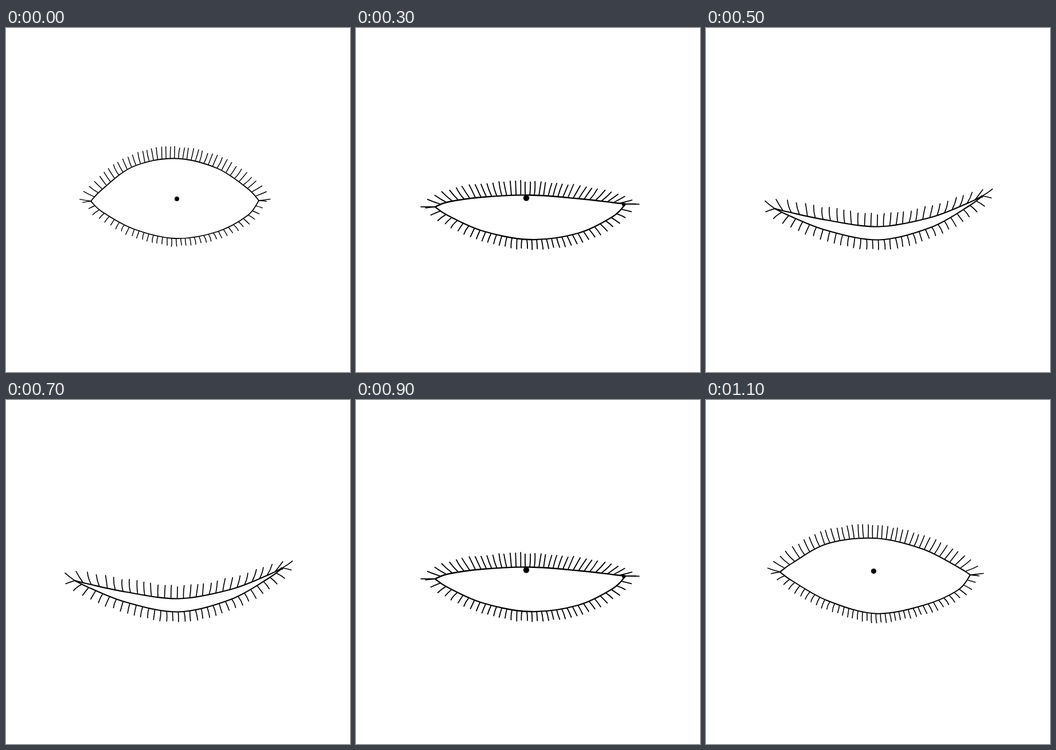
Animation of 600x600 px, one loop 1200 ms. Source, as an HTML page:

```html
<!DOCTYPE html>
<html lang="en">
<head>
<meta charset="utf-8">
<title>Blinking eye</title>
<style>
  html, body { margin: 0; width: 100%; height: 100%; overflow: hidden; background: #fff; }
  svg { display: block; width: 100vw; height: 100vh; }
  path { fill: none; stroke: #000; stroke-linecap: round; stroke-linejoin: round; }
</style>
</head>
<body>
<svg id="stage" viewBox="0 0 600 600"></svg>
<script>
const NS = "http://www.w3.org/2000/svg";
const STEP = 100;
const LEAN = 3;       // degrees every lash tilts to the right
const FLARE = 35;     // extra degrees at the very corners
const CROWDING = 0.15; // how much closer lashes stand near the corners

// heights: lid between the corners; spread: degrees the outer lashes tilt
const wide = {
  ink: 1.8, dots: [[298, 298, 4]], left: [148, 302], right: [441, 301],
  upper: { heights: [281.5, 242, 227.5, 244.5, 280], count: 41, length: 20, spread: 45 },
  lower: { heights: [320.5, 350, 367, 355.5, 327], count: 37, length: 13, spread: 48 }
};
const open = {
  ink: 2, dots: [[292.5, 298.5, 4.6]], left: [129, 300], right: [461, 305],
  upper: { heights: [284, 250.5, 241, 260, 291], count: 40, length: 23, spread: 43 },
  lower: { heights: [316, 350, 372.5, 358.5, 332], count: 41, length: 15, spread: 45 }
};
const lowered = {
  ink: 2.1, dots: [[296.5, 298, 5]], left: [131, 311], right: [470, 300],
  upper: { heights: [299, 273, 266.5, 277, 293.5], count: 39, length: 22, spread: 46 },
  lower: { heights: [329.5, 359, 376, 361, 329], count: 39, length: 18, spread: 44 }
};
const drowsy = {
  ink: 2.3, dots: [[297, 296.5, 5.2], [467, 308, 3]], left: [138, 312], right: [470, 307],
  upper: { heights: [303.5, 295, 291.5, 297.5, 304.5], count: 37, length: 24, spread: 55 },
  lower: { heights: [327, 354, 369, 358, 329], count: 37, length: 17, spread: 52 }
};
const narrow = {
  ink: 2.1, dots: [[481, 294, 2.3]], left: [120, 315], right: [482, 293],
  upper: { heights: [321, 335, 346.5, 330.5, 305], count: 30, length: 22, spread: 18 },
  lower: { heights: [327, 353, 369.5, 348, 311], count: 34, length: 17, spread: 38 }
};

// Halfway between two poses, through nested values
function midway(a, b) {
  if (typeof a === "number") return (a + b) / 2;
  if (Array.isArray(a)) return a.map((v, i) => midway(v, b[i]));
  return Object.fromEntries(Object.keys(a).map(k => [k, midway(a[k], b[k])]));
}
const nearly = midway({ ...drowsy, dots: [] }, { ...narrow, dots: [] });
const shut = { ...narrow, upper: { ...narrow.upper, heights: narrow.lower.heights } };

const poses = [wide, open, lowered, drowsy, nearly, narrow, shut];
const stage = document.getElementById("stage");

let seed = 71;
const jitter = size => {
  seed = (seed * 16807) % 2147483647;
  return (seed / 2147483647 * 2 - 1) * size;
};

function add(parent, tag, attrs) {
  const el = parent.appendChild(document.createElementNS(NS, tag));
  for (const name in attrs) el.setAttribute(name, attrs[name]);
  return el;
}

// Smooth path through points
function smooth(pts) {
  const at = i => pts[Math.max(0, Math.min(pts.length - 1, i))];
  const handle = (i, sign) => at(i).map((v, k) => v + sign * (at(i + 1)[k] - at(i - 1)[k]) / 6);
  return "M" + pts[0] + pts.slice(1).map((p, i) =>
    `C${handle(i, 1)} ${handle(i + 1, -1)} ${p}`).join("");
}

// side is -1 for lashes that point up, 1 for down
function drawLid(group, { left, right, ink }, { heights, count, length, spread }, side) {
  const mid = (left[0] + right[0]) / 2, half = (right[0] - left[0]) / 2;
  const inner = heights.map((y, i) =>
    [mid - half * Math.cos(Math.PI * (i + 1) / (heights.length + 1)), y]);
  const edge = add(group, "path", { d: smooth([left, ...inner, right]), "stroke-width": ink });
  const total = edge.getTotalLength();

  let d = "";
  for (let i = 0; i < count; i++) {
    const u = i / (count - 1);
    const along = u + CROWDING * Math.sin(2 * Math.PI * u) / (2 * Math.PI);
    const { x, y } = edge.getPointAtLength(along * total);
    const s = (x - mid) / half;
    const angle = (LEAN + spread * s + FLARE * s ** 9 + jitter(3)) * Math.PI / 180;
    const size = length + jitter(1.5);
    const dx = Math.sin(angle) * size, dy = side * Math.cos(angle) * size;
    const bend = 1.5 * s + jitter(1.2);
    d += `M${x + dx * 0.06} ${y + dy * 0.06}`
      + `Q${x + dx / 2 + bend} ${y + dy / 2} ${x + dx} ${y + dy}`;
  }
  add(group, "path", { d, "stroke-width": ink * 0.8 });
}

const groups = poses.map(pose => {
  const group = add(stage, "g", { visibility: "hidden" });
  drawLid(group, pose, pose.upper, -1);
  drawLid(group, pose, pose.lower, 1);
  for (const [cx, cy, r] of pose.dots) add(group, "circle", { cx, cy, r });
  return group;
});

// Close pose by pose, then open the same way back
const cycle = 2 * (poses.length - 1);
function show() {
  const n = Math.floor(performance.now() / STEP) % cycle;
  const now = Math.min(n, cycle - n);
  groups.forEach((g, i) => g.setAttribute("visibility", i === now ? "visible" : "hidden"));
  requestAnimationFrame(show);
}
show();
</script>
</body>
</html>
```
